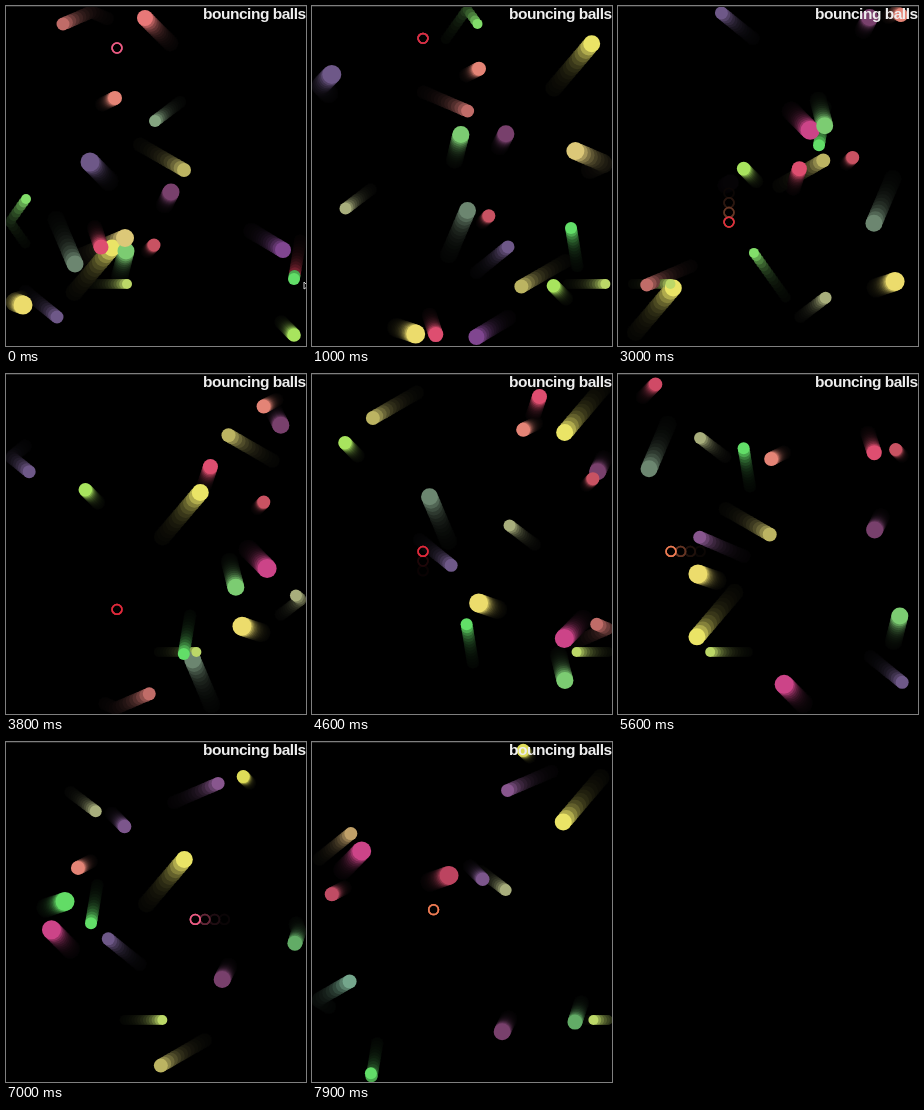
An HTML page with a canvas for the animation above (8 s loop, 300 px wide and 340 px high).

```html
<!DOCTYPE html>
<html lang="en">
<head>
<meta charset="utf-8">
<title>bouncing balls</title>
<style>
  html, body { margin: 0; width: 300px; height: 340px; overflow: hidden; background: #000; }
  canvas { display: block; }
  h1 {
    position: absolute; left: 197px; top: -.7px; margin: 0;
    font: bold 15.5px/17px "Liberation Sans", Arial, sans-serif;
    letter-spacing: -.48px; white-space: nowrap;
    color: #eee; filter: blur(.7px);
  }
</style>
</head>
<body>
<h1>bouncing balls</h1>
<canvas width="300" height="340"></canvas>
<script>
const W = 300, H = 340, LOOP = 8000, FRAME = 100, TICK = 1 / 60, TRAIL = 13;
const ctx = document.querySelector('canvas').getContext('2d');

// x, y, speed x, speed y (px/s), radius, colour, { end, recolour: [time, colour, ...] }
const balls = [
  [57, 18, -203, 87, 6.5, '#c06c68', { recolour: [5.27, '#88568e'] }],
  [139, 12, -116, -116, 8, '#e87878', { end: .2 }],
  [109, 92, 58, -29.2, 7, '#e48476', { recolour: [7.5, '#c04c64'] }],
  [149, 115, -115.5, 87.6, 6, '#84a480', { recolour: [.6, '#a8ae7c'] }],
  [178, 164, 202, 116.5, 7, '#bcb462', { recolour: [7.5, '#74a68c'] }],
  [84, 156, -86.2, -87.6, 9.5, '#6e5888', { recolour: [2.3, '#cc4488'] }],
  [165, 186, 28.9, -58.2, 8.5, '#78406c', {}],
  [20, 193, 145.5, -204.3, 5, '#82de6a', { end: 3.12 }],
  [69, 258, 86.5, 204, 8.5, '#6c8670', { end: 5.95 }],
  [106, 242, 173.7, -204.3, 8.5, '#eae466', {}],
  [120, 245, 28.9, -116.6, 8.5, '#7ccc72', { end: 6.1 }],
  [119, 232, 203, -87, 9, '#dcc878', { end: 1.7 }],
  [95, 241, 28.8, 87.6, 7.5, '#de4e70', { recolour: [6.2, '#62ac66'] }],
  [148, 239, 28.9, -29.2, 6.5, '#c85262', { recolour: [6.3, '#dedc58'] }],
  [121, 278, 172.4, 0, 5, '#bcd868', {}],
  [17, 299, 86.7, 29, 9.5, '#ecdc6c', { recolour: [6.3, '#62dc66', 7.25, '#bc4460'] }],
  [51, 311, 145, 117, 6.5, '#6e5888', { recolour: [7.5, '#c0a068'] }],
  [277, 244, 145, 87, 8, '#804690', { end: 2.83 }],
  [288, 273, -29, 176, 6, '#c83850', { recolour: [-.02, '#62de68'] }],
  [288, 329, 57.9, 58.6, 6.8, '#a8e45e', { recolour: [4.75, '#d04a66', 6.5, '#7c568c'] }]
];

// The ring moves in key-press steps: start time, direction x, direction y, steps
const STEP = 9.67, KEYS_PER_SECOND = 15;
const presses = [
  [.5, 0, -1, 1], [1.45, 0, 1, 5], [2.1, 0, 1, 16], [4.15, 0, -1, 6],
  [5.22, -1, 0, 11], [6.29, -1, 0, 18], [7.5, 0, -1, 1]
];
const ringColours = { p: '#ec5c84', r: '#e02a3c', o: '#ee7c54' };
const ringOrder = 'pprroorrrroopppo';

function bounce(start, speed, radius, size, t) {
  const low = radius - Math.abs(speed) / 120;   // balls sink slightly into the wall
  const span = size - 2 * low, lap = 2 * span;
  const d = ((start + speed * t - low) % lap + lap) % lap;
  return low + (d < span ? d : lap - d);
}

function circle(x, y, r) {
  ctx.beginPath();
  ctx.arc(x, y, r, 0, 2 * Math.PI);
}

function drawBall([x, y, vx, vy, r, colour, { end = Infinity, recolour = [] }], t) {
  if (t >= end) return;
  for (let i = 0; i < recolour.length; i += 2)
    if (t >= recolour[i]) colour = recolour[i + 1];
  ctx.fillStyle = colour;
  circle(bounce(x, vx, r, W, t), bounce(y, vy, r, H, t), r);
  ctx.fill();
}

function drawRing(t) {
  let x = 111, y = 42;
  for (const [start, dx, dy, steps] of presses) {
    const n = Math.max(0, Math.min(steps, Math.floor((t - start) * KEYS_PER_SECOND) + 1));
    x += dx * n * STEP;
    y += dy * n * STEP;
  }
  if (t >= 6) x += 291;   // wraps to the right edge
  ctx.strokeStyle = ringColours[ringOrder[Math.max(0, Math.floor(t * 2 + 1e-6))]];
  ctx.lineWidth = 1.5;
  circle(x, y, 4.9);
  ctx.stroke();
}

function drawCursor() {
  ctx.strokeStyle = '#ccc';
  ctx.lineWidth = 1;
  ctx.beginPath();
  ctx.moveTo(301, 279);
  ctx.lineTo(298, 276);
  ctx.lineTo(298, 283);
  ctx.lineTo(301, 281);
  ctx.stroke();
}

function draw(now) {
  const t = Math.floor(now % LOOP / FRAME) * FRAME / 1000;
  ctx.fillStyle = '#000';
  ctx.fillRect(0, 0, W, H);
  for (let i = TRAIL; i >= 0; i--) {
    const past = t - i * TICK;
    ctx.fillStyle = 'rgba(0,0,0,.25)';
    ctx.fillRect(0, 0, W, H);
    for (const ball of balls) drawBall(ball, past);
    drawRing(past);
  }
  ctx.fillStyle = '#222';
  ctx.fillRect(0, 0, W, 1);   // window edge
  if (t < .3) drawCursor();
}

const begin = performance.now();
function loop() {
  draw(performance.now() - begin);
  requestAnimationFrame(loop);
}
loop();
</script>
</body>
</html>
```
